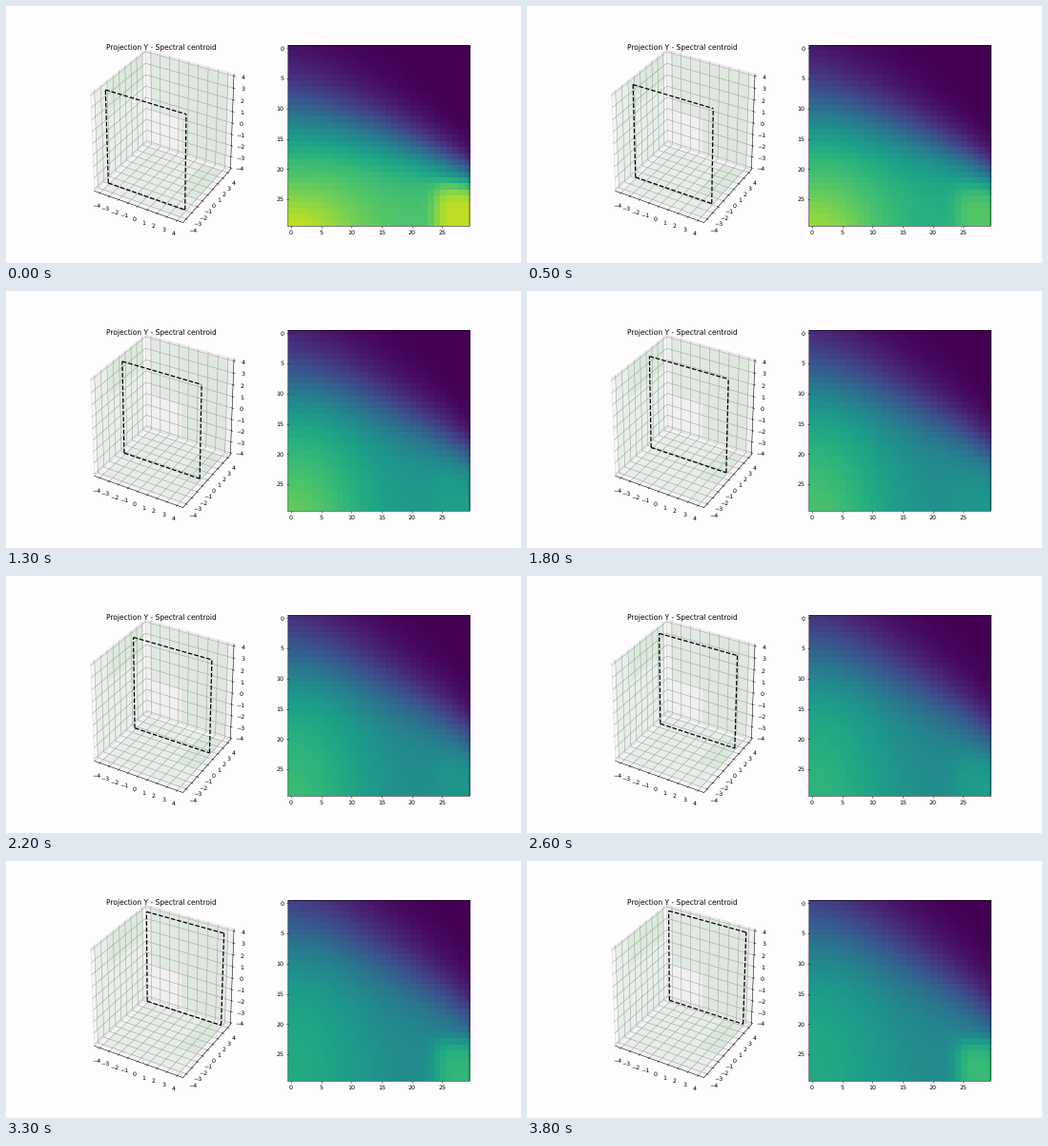
A matplotlib script for the animation above (3.9 s loop, 540x270 px).

```python
import numpy as np
import matplotlib.pyplot as plt
from matplotlib.animation import FuncAnimation

FRAMES = 39
STEP = 8 / 38           # slice travel per frame
START = -4 + 4 * STEP
SPAN = np.array([8.8, 8.8, 8.0])
EDGE = 0.5 + 1 / 48     # pane position in the unit cube
LABEL = EDGE + 0.0722   # tick label position
DIST = 10
TICKS = range(-4, 5)

elev, azim = np.radians([30, -60])
TOWARD = np.array([np.cos(elev) * np.cos(azim),
                   np.cos(elev) * np.sin(azim), np.sin(elev)])
RIGHT = np.array([-np.sin(azim), np.cos(azim), 0])
UP = np.cross(TOWARD, RIGHT)


def project(points):
    """Perspective view of points given in the centred unit cube."""
    p = np.asarray(points, float)
    w = DIST - p @ TOWARD
    return np.column_stack([p @ RIGHT / w, p @ UP / w])


def line(ax, points, **style):
    return ax.plot(*project(points).T, **style)[0]


def patch(ax, points, color, alpha):
    ax.fill(*project(points).T, color=color, alpha=alpha, lw=0)


def wall(axis, level, a, b):
    """Rectangle on the plane axis=level, spanning ranges a and b."""
    corners = [(a[0], b[0]), (a[1], b[0]), (a[1], b[1]), (a[0], b[1])]
    return [np.insert(c, axis, level) for c in np.array(corners, float)]


def mix(a, b, t):
    return a + (b - a) * t


def slice_values(depth):
    """A soft diagonal edge over a plateau, brighter in both lower corners."""
    u = (depth + 4) / 8
    row, col = np.mgrid[0:30, 0:30]
    c = col / 29

    edge = mix(12.2 - 8.2 * u, 20.8 - 2.3 * u, c ** 1.6)
    width = mix(4.2 + u, 1.5 + 1.2 * u, c)
    s = np.minimum(1, c / 0.7)
    plateau = mix(0.80 - 0.19 * u, 0.49 + 0.32 * (1 - u) ** 3, s * s * (3 - 2 * s))
    values = plateau / (1 + np.exp((edge - row) / width))

    left = np.exp(-(col / 10) ** 2 - ((row - 30) / 6) ** 2)
    right = np.exp(-((col - 28) / 4.5) ** 4 - ((row - 27) / 4.5) ** 4)
    return (values + 0.17 * (1 - u) ** 2 * left
            + (0.02 + 0.9 * (u - 0.55) ** 2) * right)


def slice_edges(depth):
    """The four sides of the slice, each running from low to high."""
    x, y, z = 4 / SPAN[0], depth / SPAN[1], 0.5
    bl, br, tl, tr = project([(-x, y, -z), (x, y, -z), (-x, y, z), (x, y, z)])
    return [np.array(side) for side in [(bl, br), (tl, tr), (bl, tl), (br, tr)]]


def draw_panes(ax):
    full = (-EDGE, EDGE)
    for axis, level, shade in [(0, -EDGE, .95), (1, EDGE, .9), (2, -EDGE, .925)]:
        corners = wall(axis, level, full, full)
        patch(ax, corners, (shade,) * 3, 0.5)
        line(ax, corners + corners[:1], color="0.85", lw=0.8)

    tints = [
        (0, -EDGE, (-.45, .46), (-.5, .5), .06),
        (0, -EDGE, (-.2, .46), (.18, .5), .05),
        (1, EDGE, (-.46, -.08), (-.12, .5), .06),
        (1, EDGE, (-.08, .46), (-.5, .5), .075),
        (2, -EDGE, (-.46, .46), (-.46, .46), .05),
        (2, -EDGE, (.22, .46), (-.1, .46), .045),
    ]
    for axis, level, a, b, alpha in tints:
        patch(ax, wall(axis, level, a, b), "green", alpha)


def draw_axes(ax):
    e = EDGE
    out, inner = e + 0.2 / 12, e - 0.1 / 12
    grid = dict(color="#9c9c9c", lw=0.8)
    black = dict(color="black", lw=0.8)
    for t in TICKS:
        x, y, z = t / SPAN
        line(ax, [(x, e, e), (x, e, -e), (x, -e, -e)], **grid)
        line(ax, [(-e, y, e), (-e, y, -e), (e, y, -e)], **grid)
        line(ax, [(-e, -e, z), (-e, e, z), (e, e, z)], **grid)
    line(ax, [(-e, -e, -e), (e, -e, -e)], **black)
    line(ax, [(e, -e, -e), (e, e, -e)], **black)
    line(ax, [(e, e, -e), (e, e, e)], **black)
    for t in TICKS:
        x, y, z = t / SPAN
        line(ax, [(x, -out, -e), (x, -inner, -e)], **black)
        line(ax, [(out, y, -e), (inner, y, -e)], **black)
        line(ax, [(out, e, z), (inner, e, z)], **black)
        spots = [(x, -LABEL, -LABEL), (LABEL, y, -LABEL), (LABEL, LABEL, z)]
        for px, py in project(spots):
            ax.text(px, py, str(t).replace("-", "\u2212"), ha="center", va="top")


plt.rcParams.update({"font.family": "DejaVu Sans", "font.size": 10,
                     "text.hinting": "none", "path.snap": False})
fig = plt.figure(figsize=(12, 6), dpi=45, facecolor="#fefcfe")

view = fig.add_subplot(121)
view.set_title("Projection Y - Spectral centroid", y=0.92)
draw_panes(view)
draw_axes(view)
sides = [view.plot(*side.T, "k--", lw=2, zorder=5)[0]
         for side in slice_edges(START)]
view.set(xlim=(-0.095, 0.09), ylim=(-0.095, 0.09))
view.axis("off")

heat = fig.add_subplot(122)
image = heat.imshow(slice_values(START), cmap="viridis", vmin=0, vmax=1)


def update(i):
    depth = min(4, START + i * STEP)
    for side, points in zip(sides, slice_edges(depth)):
        side.set_data(*points.T)
    image.set_data(slice_values(depth))
    return [*sides, image]


anim = FuncAnimation(fig, update, frames=FRAMES, interval=100, repeat=True)
plt.show()
```
